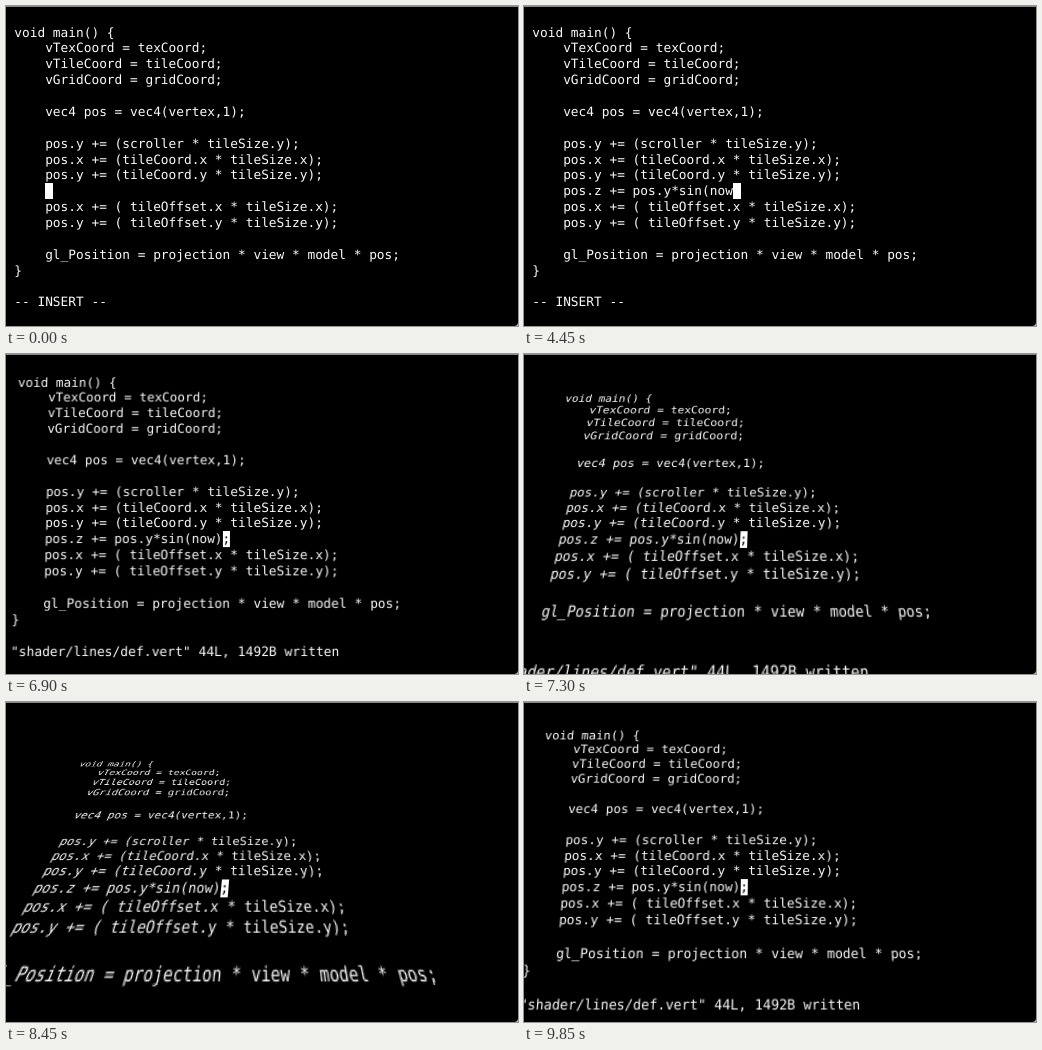
Recreate the animation shown at these times as an HTML page. Size 512 by 320 pixels, loop 9.9 s.

```html
<!DOCTYPE html>
<html lang="en">
<head>
<meta charset="utf-8">
<title>Shader editing</title>
<style>
  html, body {
    margin: 0;
    width: 100%;
    height: 100%;
    overflow: hidden;
    background: #000;
  }
  #stage {
    position: relative;
    width: 512px;
    height: 320px;
    overflow: hidden;
    background: #000;
  }
  /* window edge: top line and rounded bottom right corner */
  #stage::before, #stage::after {
    content: "";
    position: absolute;
    right: 0;
  }
  #stage::before {
    left: 0;
    top: 0;
    height: 1px;
    background: #888;
  }
  #stage::after {
    bottom: 0;
    width: 4px;
    height: 4px;
    background: radial-gradient(circle at 0 0, transparent 3.5px, #aaa 4.5px);
  }
  #screen {
    position: absolute;
    inset: 0;
    transform-origin: 256px 160px;
  }
  pre {
    position: absolute;
    left: 8.3px;
    top: 19.6px;
    margin: 0;
    color: #fafafa;
    font: 12.82px/15.88px "DejaVu Sans Mono", monospace;
    text-rendering: geometricPrecision;
    font-variant-ligatures: none;
  }
  .cursor {
    position: relative;
    z-index: 0;
    color: #000;
  }
  .cursor::before {
    content: "";
    position: absolute;
    z-index: -1;
    inset: -1.6px 0 0.6px;
    background: #fff;
  }
</style>
</head>
<body>
<div id="stage"><div id="screen"><pre>void main() {
    vTexCoord = texCoord;
    vTileCoord = tileCoord;
    vGridCoord = gridCoord;

    vec4 pos = vec4(vertex,1);

    pos.y += (scroller * tileSize.y);
    pos.x += (tileCoord.x * tileSize.x);
    pos.y += (tileCoord.y * tileSize.y);
    <span id="typed"></span>
    pos.x += ( tileOffset.x * tileSize.x);
    pos.y += ( tileOffset.y * tileSize.y);

    gl_Position = projection * view * model * pos;
}

<span id="status"></span></pre></div></div>
<script>
const LOOP = 9900;
const KEY_MS = 195;
const ESCAPE = 4950, COLON = 5350, WRITE = 5600, SAVED = 6100;
const RELOAD = 6790, PEAK = 8430, TILT = 0.00257;
const CODE = "pos.z += pos.y*sin(now);";

const screenEl = document.getElementById("screen");
const typedEl = document.getElementById("typed");
const statusEl = document.getElementById("status");

const cursor = ch => `<span class="cursor">${ch}</span>`;

function setHtml(el, html) {
  if (el.shown !== html) el.innerHTML = el.shown = html;
}

function typedLine(t) {
  if (t < ESCAPE) return CODE.slice(0, Math.floor(t / KEY_MS)) + cursor(" ");
  if (t >= COLON && t < SAVED) return CODE;
  return CODE.slice(0, -1) + cursor(CODE.at(-1));
}

function statusLine(t) {
  if (t < ESCAPE) return "-- INSERT --";
  if (t < COLON) return " ";
  if (t < WRITE) return ":" + cursor(" ");
  if (t < SAVED) return ":w" + cursor(" ");
  return '"shader/lines/def.vert" 44L, 1492B written';
}

// Depth grows with y, so the divisor is linear in y around a line just below centre.
function tilt(t) {
  if (t < RELOAD) return "none";
  const k = TILT * Math.cos((t - PEAK) / 1000);
  return `matrix3d(1,0,0,0, 0,1,0,${(-k).toFixed(8)}, 0,0,1,0, 0,0,0,${(1 + 7 * k).toFixed(8)})`;
}

function draw() {
  const t = performance.now() % LOOP;
  setHtml(typedEl, typedLine(t));
  setHtml(statusEl, statusLine(t));
  screenEl.style.transform = tilt(t);
  requestAnimationFrame(draw);
}
draw();
</script>
</body>
</html>
```
